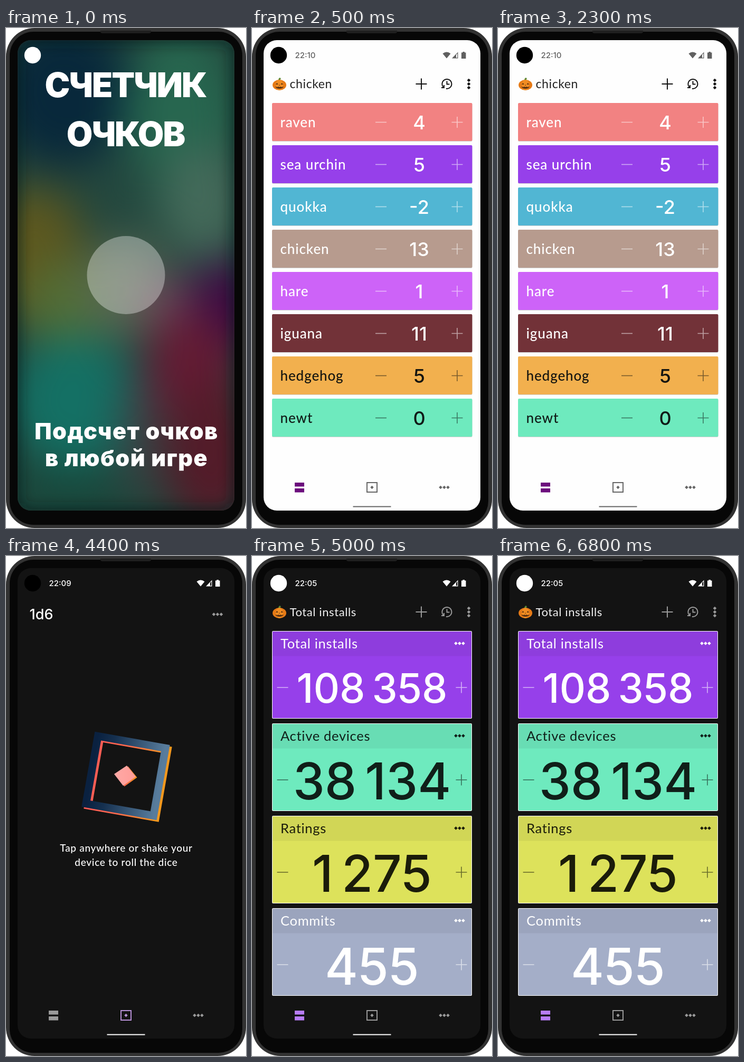
These frames come from a looping animation (455 px wide and 947 px high, 8000 ms). An HTML page:

```html
<!DOCTYPE html>
<html lang="ru">
<head>
<meta charset="utf-8">
<title>Score counter</title>
<style>
  html, body { margin: 0; width: 100%; height: 100%; overflow: hidden; background: #fff; }
  svg { display: block; width: 100vw; height: 100vh; }
  text { font-family: Lato, sans-serif; font-weight: 500; }
  .title { font: 900 64px Inter, sans-serif; letter-spacing: -2px; fill: #fff; text-anchor: middle; }
  .tagline { font: 900 43px Inter, sans-serif; letter-spacing: 1.5px; fill: #fff; text-anchor: middle; }
  .label { font-weight: 400; }
  .digits { font-family: Inter, sans-serif; word-spacing: -.1em; text-anchor: middle; }
  .clock { font: 500 15px Inter, sans-serif; }
  .line { fill: none; stroke: currentColor; }
</style>
</head>
<body>
<svg id="stage" viewBox="0 0 455 947">
  <defs>
    <clipPath id="screen"><rect x="22" y="23" width="411" height="891" rx="25"/></clipPath>
    <filter id="blur" x="-80%" y="-80%" width="260%" height="260%" color-interpolation-filters="sRGB"><feGaussianBlur stdDeviation="40"/></filter>
    <filter id="soft" x="-20%" y="-20%" width="140%" height="140%"><feGaussianBlur stdDeviation="12"/></filter>
    <linearGradient id="blue"><stop stop-color="#0a2140"/><stop offset=".25" stop-color="#15304f"/><stop offset="1" stop-color="#587c9c"/></linearGradient>
    <linearGradient id="fire"><stop stop-color="#ff5c55"/><stop offset=".45" stop-color="#fb6a4c"/><stop offset="1" stop-color="#f5981d"/></linearGradient>
    <linearGradient id="pink"><stop stop-color="#ffa9a6"/><stop offset="1" stop-color="#ff9c98"/></linearGradient>
  </defs>
  <rect width="455" height="947" rx="54" fill="#323232"/>
  <rect x="7" y="7" width="441" height="934" rx="45" fill="#070707"/>
  <path d="M179 5h96v2q0 3-4 3h-88q-4 0-4-3z" fill="#1f1f1f"/>
  <g id="view" clip-path="url(#screen)"></g>
</svg>
<script>
const rect = (x, y, w, h, fill, extra = '') =>
  `<rect x="${x}" y="${y}" width="${w}" height="${h}" fill="${fill}" ${extra}/>`;
const text = (x, y, str, size, fill, extra = '') =>
  `<text x="${x}" y="${y}" style="font-size:${size}px" fill="${fill}" ${extra}>${str}</text>`;
const line = (d, color, width, extra = '') =>
  `<path class="line" d="${d}" color="${color}" stroke-width="${width}" ${extra}/>`;
const minus = (x, y, color, width, extra) => line(`M${x - 10.5} ${y}h21`, color, width, extra);
const plus = (x, y, color, width, extra) =>
  line(`M${x - 10.5} ${y}h21M${x} ${y - 10.5}v21`, color, width, extra);
const diamond = (x, y, r) => `M${x} ${y - r}l${r} ${r}l${-r} ${r}l${-r} ${-r}z`;
const dots = (x, y, color, dx = 7, dy = 0) =>
  `<path fill="${color}" d="${[-1, 0, 1].map(i => diamond(x + i * dx, y + i * dy, 3.3)).join('')}"/>`;
const screen = fill => rect(22, 23, 411, 891, fill);
const camera = fill => `<circle cx="50.5" cy="51.5" r="15.7" fill="${fill}"/>`;

function statusBar(time, color, lens) {
  return camera(lens) + `<text class="clock" x="81.5" y="57" fill="${color}">${time}</text>
    <g fill="${color}">
      <path d="M361.5 48.5q7.5-6 15 0l-7.500 9z"/>
      <path d="M379 57.5l11.500-12v12zm8 -1.200h2.300v-8l-2.300 2.400z" fill-rule="evenodd"/>
      <path d="M397 46.5h2.500v-1.500h3.500v1.500h2.500v11.500h-8.500z"/>
    </g>`;
}

function navBar(active, accent, idle, home) {
  const color = i => i === active ? accent : idle;
  return rect(81, 861, 18, 7.5, color(0)) + rect(81, 872, 18, 7.5, color(0)) +
    line('M218 861h19v18h-19z', color(1), 2) +
    `<path fill="${color(1)}" d="${diamond(227.5, 870, 3.2)}"/>` +
    dots(364.5, 870, color(2)) + line('M191.5 906.5h72', home, 2);
}

const pumpkin = `<g transform="translate(52 106)">
  <path d="M-2-7q0-4 3-5l2 2q-2 1-1 4z" fill="#5d8a35"/>
  <ellipse cy="2" rx="13" ry="10" fill="#e67a16"/>
  <ellipse cy="2" rx="7" ry="10" fill="#f08c22"/>
  <path d="M-7 1l2.500-3l2 3zM2.500 1l2-3l2.500 3zM-1 3l1-2l1 2zM-8 5l4 1l2-1l2 1l2-1l2 1l4-1q-2 4-8 4t-8-4z" fill="#5a3010"/>
</g>`;

function toolbar(title, size, ink, iconColor) {
  return pumpkin + text(71.5, 114, title, size, ink, 'class="label" letter-spacing=".6"') +
    plus(321, 106, iconColor, 2) +
    line('M363.2 112.5a9 9 0 1 1 4.800 2.400M359 113h5v-5M369.5 100.5v6h5', iconColor, 2) +
    dots(411, 106, iconColor, 0, 7);
}

function splash() {
  // x, y, rx, ry, colour
  const glows = [
    [110, 120, 130, 140, '#08283b'], [330, 180, 110, 190, '#27664f'], [375, 330, 80, 110, '#446a5a'],
    [215, 310, 70, 80, '#24483f'], [50, 430, 100, 130, '#5d581f'], [115, 530, 80, 90, '#526d36'],
    [225, 490, 75, 95, '#586853'], [130, 705, 125, 125, '#147064'], [425, 525, 85, 85, '#3d0a44'],
    [305, 525, 50, 60, '#684559'], [350, 650, 90, 110, '#641b34'], [390, 810, 90, 140, '#541b29'],
    [255, 770, 40, 120, '#3b4144'], [110, 880, 130, 50, '#18483c']
  ];
  return screen('#23443b') +
    `<g filter="url(#blur)">${glows.map(([x, y, rx, ry, c]) =>
      `<ellipse cx="${x}" cy="${y}" rx="${rx}" ry="${ry}" fill="${c}"/>`).join('')}</g>` +
    rect(18, 19, 419, 899, 'none', 'rx="27" stroke="#101b1c" stroke-width="18" opacity=".7" filter="url(#soft)"') +
    camera('#fff') + `<circle cx="227.5" cy="468" r="74" fill="#fff" opacity=".34"/>
    <text class="title" x="226.5" y="131">СЧЕТЧИК</text>
    <text class="title" x="226.5" y="224">ОЧКОВ</text>
    <text class="tagline" x="228.5" y="779">Подсчет очков</text>
    <text class="tagline" x="228.5" y="830">в любой игре</text>`;
}

function scoreList() {
  const rows = [
    ['raven', 4, '#f28282'], ['sea urchin', 5, '#9640ea'], ['quokka', '-2', '#51b6d3'],
    ['chicken', 13, '#b79b8e'], ['hare', 1, '#cd63f8'], ['iguana', 11, '#723238'],
    ['hedgehog', 5, '#f2b04e', '#151510'], ['newt', 0, '#6eeabe', '#101b17']
  ];
  return screen('#fefefe') + statusBar('22:10', '#606060', '#000') +
    toolbar('chicken', 23, '#222', '#111') +
    rows.map(([name, score, fill, ink = '#fff'], i) => {
      const y = 142 + i * 80;
      return rect(38, y + 1, 379.5, 72, '#000', 'rx="2" opacity=".18"') +
        rect(38, y, 379.5, 72, fill, 'rx="2"') +
        text(53.5, y + 46, name, 26, ink, 'letter-spacing=".9"') +
        text(317, y + 50, score, 36, ink, 'class="digits" font-weight="600"') +
        minus(244.5, y + 36.5, ink, 1.6, 'opacity=".55"') + plus(389, y + 36.5, ink, 1.6, 'opacity=".55"');
    }).join('') + navBar(0, '#6b0c7c', '#666', '#666');
}

function dice() {
  const frame = (dx, dy, paint) =>
    `<rect x="-65" y="-65" width="130" height="130" fill="none" stroke="url(#${paint})" stroke-width="14.5"
      transform="translate(${227 + dx} ${416.5 + dy}) rotate(10)"/>`;
  const pip = (dx, dy, paint) =>
    `<path d="M205 413L229 397L246 418L222 435z" fill="url(#${paint})" transform="translate(${dx} ${dy})"/>`;
  const hint = (y, str) => text(228, y, str, 19, '#fff', 'text-anchor="middle" letter-spacing=".7"');
  return screen('#131313') + statusBar('22:09', '#fff', '#000') +
    text(67, 120, '1d6', 27, '#fff', 'class="digits"') + dots(401, 110.5, '#999') +
    frame(4, 3.5, 'fire') + frame(0, 0, 'blue') + pip(2.5, 1.5, 'fire') + pip(0, 0, 'pink') +
    hint(560, 'Tap anywhere or shake your') + hint(587, 'device to roll the dice') +
    navBar(1, '#b791d6', '#999', '#fff');
}

function counters() {
  const cards = [
    ['Total installs', '108 358', 77, 278, '#9640ea', '#fff'],
    ['Active devices', '38 134', 96, 461, '#6eeabe', '#101f19'],
    ['Ratings', '1 275', 96, 636, '#dde25b', '#1b1c0a'],
    ['Commits', '455', 96, 812, '#a4aec8', '#fff']
  ];
  return screen('#131313') + statusBar('22:05', '#fff', '#fff') +
    toolbar('Total installs', 22, '#f2f2f2', '#999') +
    cards.map(([name, value, size, base, fill, ink], i) => {
      const y = 143 + i * 175;
      return rect(38, y - 1, 379, 166, '#fff', 'rx="2"') + rect(39, y, 377, 164, fill, 'rx="1"') +
        rect(39, y, 377, 46.5, '#000', 'opacity=".055"') +
        text(54, y + 32, name, 25.5, ink, 'class="label" letter-spacing=".7"') +
        dots(393.5, y + 22.5, ink) +
        text(227.5, base, value, size, ink, 'class="digits"') +
        minus(58, y + 106, ink, 1.6, 'opacity=".6"') + plus(397, y + 106, ink, 1.6, 'opacity=".6"');
    }).join('') + navBar(0, '#b77cf8', '#999', '#fff');
}

const scenes = [[0, splash], [500, scoreList], [3500, dice], [5000, counters]];
const view = document.getElementById('view');
view.innerHTML = scenes.map(([, draw]) => `<g>${draw()}</g>`).join('');

function tick() {
  const t = performance.now() % 8000;
  const current = scenes.findLastIndex(([start]) => t >= start);
  [...view.children].forEach((g, i) => g.style.display = i === current ? '' : 'none');
  requestAnimationFrame(tick);
}
tick();
</script>
</body>
</html>
```
